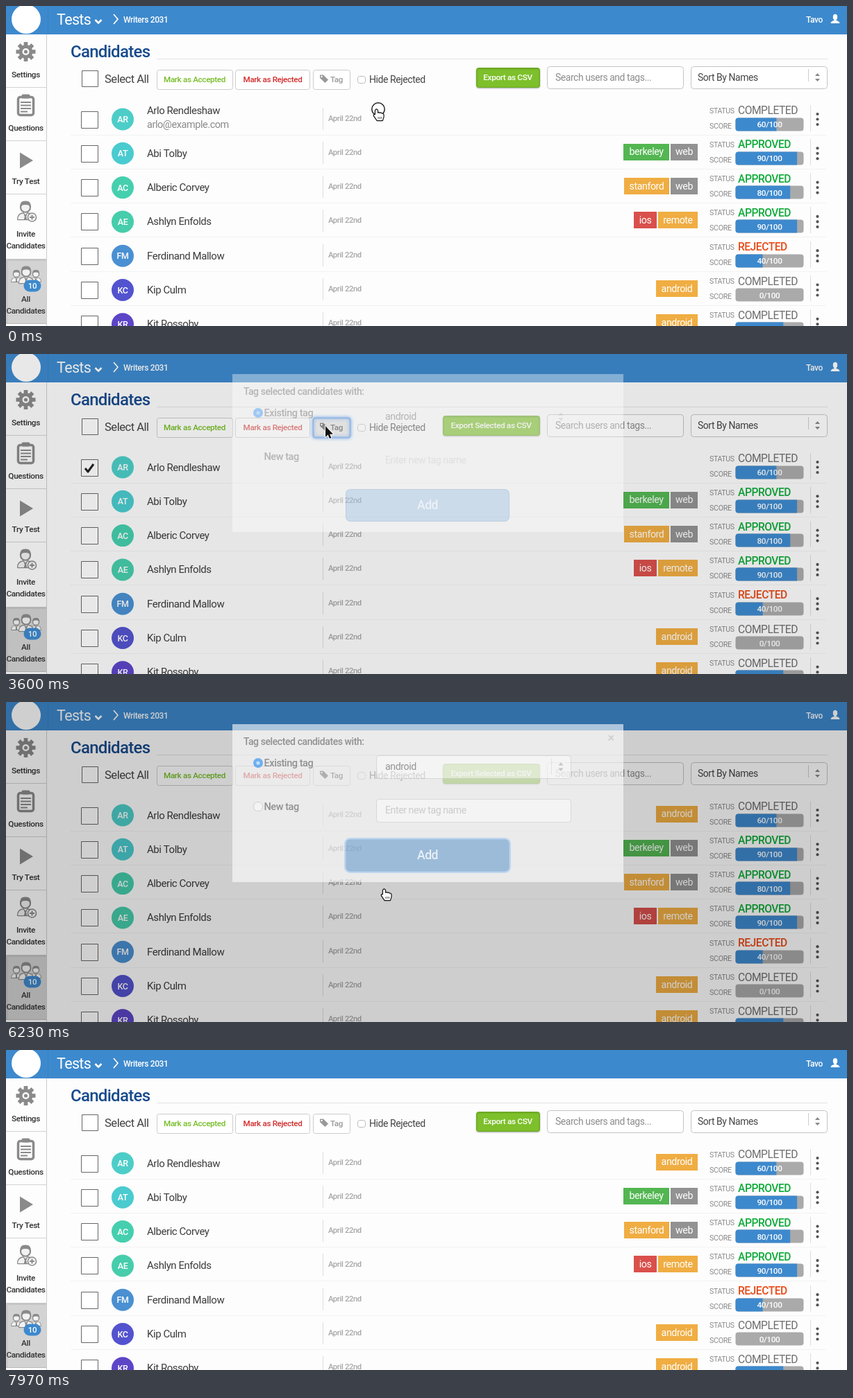
These frames come from a looping animation (1211x462 px, 9100 ms). An HTML page with a canvas:

```html
<!DOCTYPE html>
<html lang="en">
<head>
<meta charset="utf-8">
<title>Candidates</title>
<style>
html, body { margin: 0; width: 100%; height: 100%; overflow: hidden; background: #fdfdfd; }
canvas { display: block; width: 1211px; height: 462px; }
</style>
</head>
<body>
<canvas id="stage" width="1211" height="462"></canvas>
<script>
const ctx = document.getElementById('stage').getContext('2d');
const LOOP = 9100, BLUE = '#3d89cd', ORANGE = '#f0ad42', GREY = '#8a8a8a';
const clamp = v => Math.max(0, Math.min(1, v));
const easeInOut = p => p < .5 ? 4 * p ** 3 : 1 - (2 - 2 * p) ** 3 / 2;
const easeOut = p => 1 - (1 - p) ** 2.7;

// ---------- drawing helpers ----------
function text(str, x, y, size, color, weight = 400, align = 'left') {
  ctx.font = `${weight} ${size}px Roboto, Lato, sans-serif`;
  ctx.letterSpacing = `${-.03 * size}px`;
  ctx.textAlign = align;
  ctx.fillStyle = color;
  ctx.fillText(str, x, y);
}
function rect(x, y, w, h, color) {
  ctx.fillStyle = color;
  ctx.fillRect(x, y, w, h);
}
function box(x, y, w, h, r, fill, stroke, width = 1) {
  ctx.beginPath();
  ctx.roundRect(x + .5, y + .5, w - 1, h - 1, r);
  if (fill) { ctx.fillStyle = fill; ctx.fill(); }
  if (stroke) { ctx.strokeStyle = stroke; ctx.lineWidth = width; ctx.stroke(); }
}
function disc(x, y, r, fill, stroke, width = 1) {
  ctx.beginPath();
  ctx.arc(x, y, r, 0, 7);
  if (fill) { ctx.fillStyle = fill; ctx.fill(); }
  if (stroke) { ctx.strokeStyle = stroke; ctx.lineWidth = width; ctx.stroke(); }
}
function shape(d, x, y, fill, stroke, width = 1) {
  const path = new Path2D(d);
  ctx.save();
  ctx.translate(x, y);
  ctx.lineJoin = 'round';
  if (stroke) { ctx.strokeStyle = stroke; ctx.lineWidth = width; ctx.stroke(path); }
  if (fill) { ctx.fillStyle = fill; ctx.fill(path); }
  ctx.restore();
}
function glow(color, blur, y, draw) {
  ctx.save();
  ctx.shadowColor = color;
  ctx.shadowBlur = blur;
  ctx.shadowOffsetY = y;
  draw();
  ctx.restore();
}
const sortArrows = (x, y) => shape('M-3.5-2L0-6 3.5-2ZM-3.5 2L0 6 3.5 2Z', x, y, '#888');

// ---------- timing ----------
const moves = [
  { t: 620, end: 1480, n: 13, to: [131, 169], ease: easeInOut },
  { t: 1540, end: 1540, n: 1, to: [128, 171], ease: easeInOut },
  { t: 2490, end: 3120, n: 8, to: [467, 114], ease: easeInOut },
  { t: 3600, end: 3600, n: 1, to: [461, 113], ease: easeInOut },
  { t: 4412, end: 5150, n: 9, to: [548, 278], ease: easeInOut },
  { t: 6940, end: 7800, n: 10, to: [1145, 476], ease: easeOut }
];
function cursorAt(t) {
  let pos = [537, 157];
  for (const m of moves) {
    if (t < m.t) break;
    const step = (m.end - m.t) / (m.n - 1) || 1;
    const p = m.ease(Math.min(m.n, 1 + Math.floor((t - m.t) / step + 1e-6)) / m.n);
    pos = pos.map((v, i) => v + (m.to[i] - v) * p);
  }
  return pos;
}

// time, backdrop, panel and label alpha, control alpha, vertical offset
const modalSteps = [
  [0, 0, 0, 0, 0],
  [3420, .03, 0, 0, -57],
  [3510, .06, .2, .08, -57],
  [3600, .09, .38, .2, -57],
  [3750, .4, 1, 1, -26],
  [3900, .5, 1, 1, 0],
  [6120, .4, .85, .8, -30],
  [6230, .19, .6, .45, -54],
  [6320, 0, 0, 0, 0]
];

// ---------- data ----------
const tagStyles = {
  berkeley: [66, '#53b652'], web: [39, '#929292'], stanford: [65, ORANGE],
  ios: [33, '#d9504c'], remote: [57, ORANGE], android: [60, ORANGE]
};
const statusColors = { COMPLETED: '#6e6e6e', APPROVED: '#0fab3a', REJECTED: '#ea4a17' };
// hover: [enter, leave]
const rows = [
  { name: 'Arlo Rendleshaw', color: '#4dcdc8', status: 'COMPLETED', score: 60, tags: [], hover: [-300, 2600] },
  { name: 'Abi Tolby', color: '#4acbcf', status: 'APPROVED', score: 90, tags: ['berkeley', 'web'] },
  { name: 'Alberic Corvey', color: '#45cfae', status: 'APPROVED', score: 80, tags: ['stanford', 'web'], hover: [6500, 7060] },
  { name: 'Ashlyn Enfolds', color: '#46cdab', status: 'APPROVED', score: 90, tags: ['ios', 'remote'], hover: [7050, 7130] },
  { name: 'Ferdinand Mallow', color: '#4a90d2', status: 'REJECTED', score: 40, tags: [], hover: [7120, 7160] },
  { name: 'Kip Culm', color: '#5353cf', status: 'COMPLETED', score: 0, tags: ['android'], hover: [7200, 7600] },
  { name: 'Kit Rossoby', color: '#5d45c8', status: 'COMPLETED', score: 70, tags: ['android'], hover: [7500, 7760] }
];

// ---------- page parts ----------
function header() {
  rect(0, 0, 1211, 41, BLUE);
  rect(60, 0, 1, 41, '#3780c2');
  disc(29, 19, 21, '#fff');
  text('Tests', 73, 27, 21.5, '#fff');
  shape('M-4.5-2L0 2.5 4.5-2', 133, 22, null, '#fff', 2.6);
  shape('M-3-7L3 0-3 7', 158, 19, null, '#fff', 1.8);
  text('Writers 2031', 169, 23.5, 12, '#fff', 500);
  text('Tavo', 1152, 23.5, 12, '#fff', 500);
  ctx.beginPath();
  ctx.ellipse(1194, 16, 3.2, 4.2, 0, 0, 7);
  ctx.fill();
  shape('M-6.5 6Q-6 2.5-1.5 2V-1H1.5V2Q6 2.5 6.5 6Z', 1194, 19, '#fff');
}

function person(x, y, s) {
  ctx.save();
  ctx.translate(x, y);
  ctx.scale(s, s);
  shape('M-10 13Q-10 6-3 5L0 9 3 5Q10 6 10 13Z', 0, 0, '#f2f2f2', GREY, 2.4);
  disc(0, -3, 6.5, '#f2f2f2', GREY, 2);
  shape('M-7-3Q-8-12 0-11.5 8-12 7-3 5-7 0-6.5-5-7-7-3Z', 0, 0, GREY);
  shape('M-2 7H2L1 9 2 13H-2L-1 9Z', 0, 0, GREY);
  ctx.restore();
}

function sidebar() {
  rect(0, 41, 58, 421, '#fdfdfd');
  rect(0, 365, 58, 93, '#d3d3d3');
  rect(0, 365, 58, 3, '#c5c5c5');
  rect(0, 365, 3, 93, '#cacaca');
  rect(0, 458, 58, 1, '#b8b8b8');
  rect(58, 41, 1, 421, '#ccc');
  for (const y of [117, 194, 271]) rect(0, y, 58, 1, '#d2d2d2');

  ctx.save();
  ctx.translate(28.5, 66);
  for (let i = 0; i < 8; i++) {
    rect(-2.8, -14, 5.6, 6, GREY);
    ctx.rotate(Math.PI / 4);
  }
  disc(0, 0, 7.5, null, GREY, 5);
  disc(0, 0, 2.6, GREY);
  ctx.restore();

  box(17, 131, 23, 27, 3, '#fdfdfd', GREY, 3.5);
  box(22, 127, 13, 7, 2, GREY);
  for (let i = 0; i < 4; i++) rect(21, 138 + i * 4.5, i === 3 ? 10 : 15, 2, GREY);
  shape('M-9-11.5L10 0-9 11.5Z', 29, 223, GREY);

  person(28, 294, 1.08);
  disc(37.5, 305, 6, '#fdfdfd', GREY, 1.6);
  rect(34, 304, 7, 2, GREY);
  rect(36.5, 301.5, 2, 7, GREY);
  person(15, 389, .7);
  person(43, 389, .7);
  person(29, 387, 1);
  box(25, 395, 26, 18, 9, BLUE);
  text('10', 38, 408, 11.5, '#fff', 500, 'center');

  [['Settings', 102.5], ['Questions', 179.5], ['Try Test', 256.5], ['Invite', 333], ['Candidates', 350],
    ['All', 427], ['Candidates', 444]].forEach(([s, y]) => text(s, 28.5, y, 11.8, '#333', 500, 'center'));
}

function toolbar(t) {
  const selected = t >= 2230 && t < 6320;
  const focused = t >= 3420 && t < 6120;
  const [px, py] = cursorAt(t - 90);
  const over = (x, w) => t >= 2490 && t < 6120 && (focused ? x === 442 : py < 128 && px >= x && px < x + w);
  const button = (x, w) => box(x, 92, w, 29, 3, over(x, w) ? '#e2e2e2' : '#fff', '#ccc');

  text('Candidates', 93, 74, 24, '#174a8c', 500);
  rect(217, 76, 966, 1, '#e3e3e3');
  box(109, 93, 24, 24, 0, '#fff', '#666');
  text('Select All', 142, 111, 16.6, '#444');
  button(217, 110);
  text('Mark as Accepted', 271.5, 109.5, 11.7, '#75bd25', 500, 'center');
  button(330, 108);
  text('Mark as Rejected', 384, 109.5, 11.7, '#d32b2b', 500, 'center');
  if (focused) glow('#3c8cf0', 5, 0, () => box(442, 92, 54, 29, 3, '#e2e2e2', '#5b9be8', 2));
  else button(442, 54);
  const ink = selected ? '#444' : '#999';
  shape('M-6-5H-1L6 2 1.5 6.5-6-.5Z', 458, 104.5, ink);
  disc(454.5, 102, 1.2, '#fff');
  text('Tag', 467, 109.5, 11.6, ink, 500);
  box(506, 101, 12, 11, 3, '#fff', '#bbb');
  text('Hide Rejected', 523, 110.5, 14, '#444');

  const x = selected ? 629 : 677;
  glow('rgba(0,0,0,.25)', 2, 1, () => box(x, 89, 769 - x, 29, 3, '#7dc02b', '#6caa27'));
  text(selected ? 'Export Selected as CSV' : 'Export as CSV', (x + 768) / 2, 106.5, 11.8, '#fff', 500, 'center');
  box(779, 87, 197, 33, 4, '#fff', '#c4c4c4');
  text('Search users and tags...', 791, 108, 13.9, '#8c8c8c');
  box(986, 87, 197, 33, 4, '#fff', '#c4c4c4');
  text('Sort By Names', 996, 108, 13.9, '#444');
  rect(1155, 91, 1, 18, '#ccc');
  sortArrows(1168.5, 103);
}

function candidate(row, i, t) {
  const cy = 163.5 + i * 49.3, top = Math.round(cy);
  const [enter, leave] = row.hover || [1e5, 1e5];
  const p = Math.min(clamp((t - enter) / 270), clamp(1 - (t - leave) / 220));

  rect(93, top + 22, 1088, 1, 'rgba(0,0,0,.045)');
  box(108, top - 12, 25, 25, 0, '#fff', '#666');
  if (i === 0 && t >= 2140 && t < 6120) shape('M-6 0L-2 5 6-6', 120, 165, null, '#222', 3);
  disc(168, cy, 16, row.color);
  text(row.name.split(' ').map(w => w[0]).join(''), 168, cy + 4.5, 12.5, '#fff', 500, 'center');

  ctx.save();
  ctx.beginPath();
  ctx.rect(200, cy - 24, 250, 46.5);
  ctx.clip();
  text(row.name, 203, cy + 5 - 13 * p, 15, '#3c3c3c');
  if (p > 0 && t < leave) {
    text(row.name.split(' ')[0].toLowerCase() + '@example.com', 203, cy + 29 - 16.5 * p, 14.5, '#8a8a8a');
  }
  ctx.restore();

  rect(456, top - 17, 1, 32, '#ddd');
  text('April 22nd', 464, cy + 2, 11.2, '#a6a6a6', 500);

  let right = 996;
  const tags = i === 0 && t >= 6120 ? ['android'] : row.tags;
  [...tags].reverse().forEach(tag => {
    const [w, color] = tagStyles[tag];
    rect(right - w, top - 14, w, 24, color);
    text(tag, right - w / 2, cy + 2.5, 14.2, '#fff', 400, 'center');
    right -= w + 2;
  });

  text('STATUS', 1013, cy - 9, 10.5, '#8a8a8a');
  text(row.status, 1054, cy - 7.5, 15.6, statusColors[row.status], row.status === 'COMPLETED' ? 400 : 500);
  text('SCORE', 1013, cy + 13, 10.7, '#8a8a8a');
  box(1050, top - 3, 99, 20, 4, '#aaa');
  ctx.save();
  ctx.clip();
  rect(1050, top - 3, 99 * row.score / 100, 20, BLUE);
  ctx.restore();
  text(row.score + '/100', 1099.5, cy + 11.5, 11.8, '#fff', 500, 'center');
  rect(1158, top - 21, 1, 38, '#ddd');
  for (const dy of [-7.5, 0, 7.5]) disc(1168.5, cy + dy, 2.1, '#555');
}

function modal(t) {
  const [, dim, panel, control, dy] = modalSteps.filter(s => s[0] <= t).pop();
  if (dim) rect(0, 0, 1211, 462, `rgba(0,0,0,${dim})`);
  if (!panel) return;
  const closing = t >= 6020, framed = control > .3;
  ctx.save();
  ctx.translate(0, dy);

  ctx.globalAlpha = panel;
  rect(326, 86, 563, 228, '#fff');
  text('Tag selected candidates with:', 342, 115.5, 14, '#555', 500);
  text('Existing tag', 371.5, 146.5, 14.5, '#555', 500);
  text('New tag', 371.5, 209.5, 14.5, '#555', 500);
  disc(363, 142, 7, '#1b87f5');
  disc(363, 142, 2.6, '#fff');

  ctx.globalAlpha = control;
  if (framed) {
    text('×', 871, 112, 18, '#aaa', 500, 'center');
    disc(363, 205, 6.5, '#fff', '#aaa');
    box(533, 131, 281, 34, 4, '#fff', '#bbb');
    rect(785, 136, 1, 23, '#ccc');
    box(533, 194, 281, 34, 4, closing ? '#fff' : '#ededed', '#bbb');
  }
  sortArrows(799, 147.5);
  text('Enter new tag name', 546, 215, 14.1, '#999');
  if (closing) box(488, 251, 238, 49, 7, null, '#8dbcf2', 3);
  else if (framed) glow('rgba(0,0,0,.35)', 3, 2, () => box(489, 252, 236, 47, 6, '#3574b3'));
  box(489, 252, 236, 47, 6, t >= 4900 ? '#3a80c2' : '#3f89d0', closing ? null : '#3574b3');

  ctx.globalAlpha = panel;
  text('android', 546, 152, 14.2, '#555');
  ctx.globalAlpha = Math.sqrt(panel);
  text('Add', 607, 281, 17.6, '#fff', 500, 'center');
  ctx.restore();
}

function pointer(t) {
  const [x, y] = cursorAt(t);
  if (t < 60) disc(536, 149, 9.2, '#fff', '#222', 1.5);
  if (t >= 4320 && t < 5150 && y < 122) {
    shape('M-3-11Q0-11 0-9 0-11 3-11M0-9V3M-3 5Q0 5 0 3 0 5 3 5M-1.5-2H1.5', x, y - 1, null, '#111', 1.5);
  } else if (t >= 3600 && y < 250) {
    shape('M-1-9V7L2.6 3.6 4.9 9 7.4 7.9 5.1 2.7H10Z', x, y, '#111', '#fff', 2);
  } else {
    shape('M-5-6Q-3.5-9-2-6V-2Q-.5-3.5 1-2 2.5-3 3.7-1.5 6-2 6.5 0V3L5 8H-2.5L-7 1.5Q-7.5-.5-5.5 0L-5 .8Z',
      x, y, '#fff', '#111', 2.4);
    shape('M-1 3V6M1.2 3V6M3.4 3V6', x, y, null, '#333', .8);
  }
}

function render(t) {
  rect(0, 0, 1211, 462, '#fdfdfd');
  toolbar(t);
  rows.forEach((row, i) => candidate(row, i, t));
  sidebar();
  header();
  modal(t);
  pointer(t);
}

let start;
function tick(now) {
  start ??= now;
  render((now - start) % LOOP);
  requestAnimationFrame(tick);
}
render(0);
requestAnimationFrame(tick);
</script>
</body>
</html>
```
